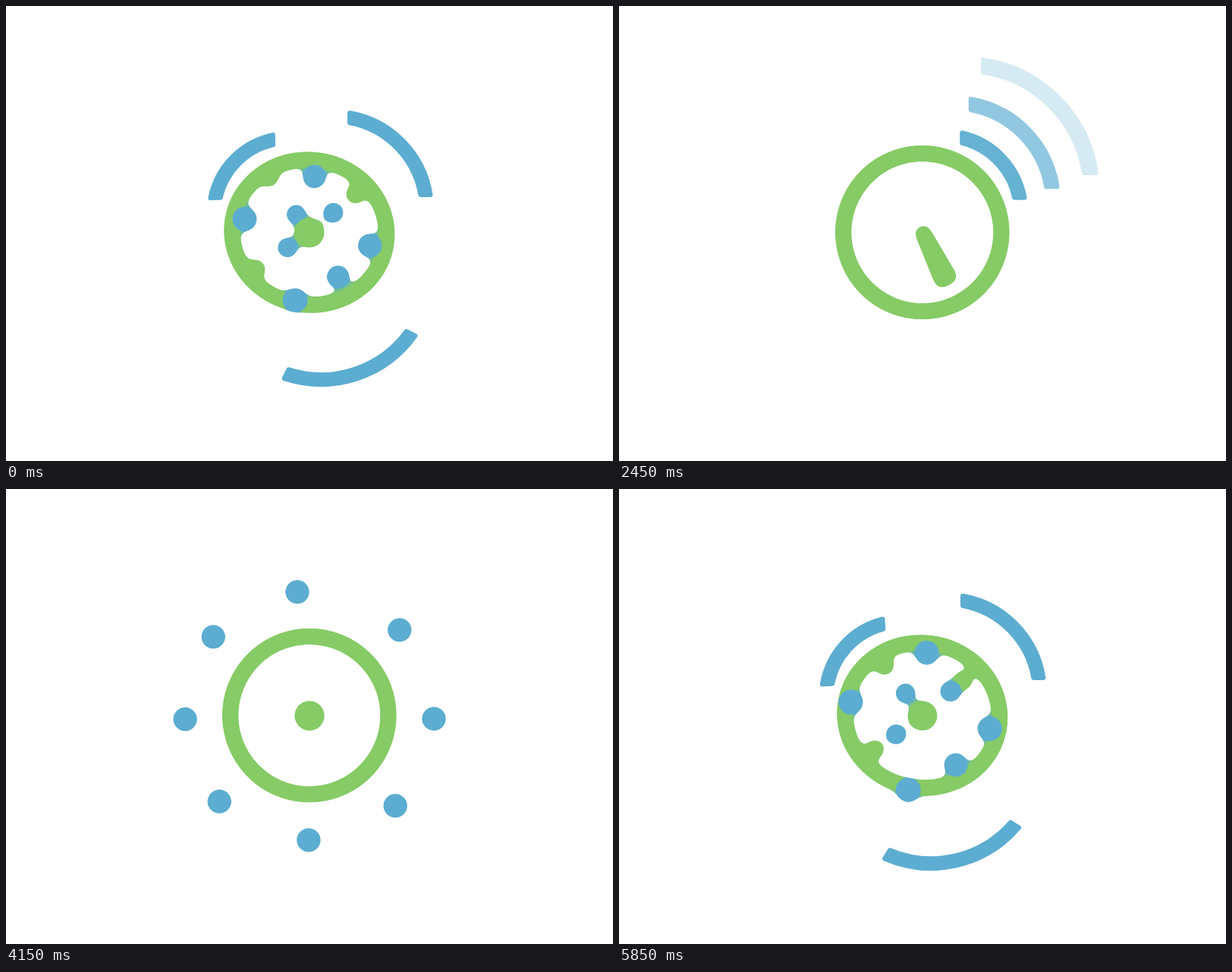
An HTML page for the animation above (5900 ms loop, 800 px wide and 600 px high).

```html
<!DOCTYPE html>
<html lang="en">
<head>
<meta charset="utf-8">
<title>Gooey signal clock</title>
<style>
  html, body { margin: 0; width: 100%; height: 100%; overflow: hidden; background: #fff; }
  svg { display: block; width: 800px; height: 600px; }
</style>
</head>
<body>
<svg viewBox="0 0 800 600">
  <defs>
    <filter id="goo" filterUnits="userSpaceOnUse" x="0" y="0" width="800" height="600" color-interpolation-filters="sRGB">
      <feGaussianBlur in="SourceGraphic" stdDeviation="6" result="blur"/>
      <feColorMatrix in="blur" values="1 0 0 0 0  0 1 0 0 0  0 0 1 0 0  0 0 0 18 -8.3" result="goo"/>
      <feComposite in="SourceGraphic" in2="goo" operator="atop"/>
    </filter>
  </defs>
  <g id="arcs"></g>
  <g id="blobs" filter="url(#goo)"></g>
</svg>
<script>
const LOOP = 5900, FRAME = 50;
const GREEN = '#86cb66', BLUE = '#5cadd1';
const ORBIT = 164, OUT_TIME = 800, IN_TIME = 1450;
const CX = 400, CY = 299;

const arcLayer = document.getElementById('arcs');
const blobLayer = document.getElementById('blobs');

function add(parent, tag, attrs) {
  const el = document.createElementNS('http://www.w3.org/2000/svg', tag);
  set(el, attrs);
  parent.appendChild(el);
  return el;
}
function set(el, attrs) {
  for (const name in attrs) el.setAttribute(name, attrs[name]);
}
const clamp = x => Math.min(1, Math.max(0, x));
const show = (el, on) => set(el, { display: on ? 'inline' : 'none' });

// Smooth monotone curve through [time, value] keys.
function track(...keys) {
  const n = keys.length;
  const sec = i => (keys[i + 1][1] - keys[i][1]) / (keys[i + 1][0] - keys[i][0]);
  const slope = i => {
    if (i === 0) return sec(0);
    if (i === n - 1) return sec(n - 2);
    const a = sec(i - 1), b = sec(i);
    return a * b <= 0 ? 0 : 2 * a * b / (a + b);
  };
  return t => {
    if (t <= keys[0][0]) return keys[0][1];
    if (t >= keys[n - 1][0]) return keys[n - 1][1];
    let i = 0;
    while (t > keys[i + 1][0]) i++;
    const h = keys[i + 1][0] - keys[i][0], u = (t - keys[i][0]) / h, v = 1 - u;
    return keys[i][1] * v * v * (1 + 2 * u) + keys[i + 1][1] * u * u * (3 - 2 * u)
      + h * u * v * (slope(i) * v - slope(i + 1) * u);
  };
}

// The timeline runs from 3100 to 9000, so the loop seam falls where little moves.
const spin = track([3100, -76], [3650, -50], [4850, 0], [5900, 28], [6700, 44]);
const squash = track([5450, 0], [5800, 1], [5950, 1], [6300, 0]);
const hubSize = track([3100, 16], [3300, 19.5], [4850, 20.5], [5900, 20], [6650, 22.5], [7150, 8], [8600, 8], [9000, 16]);
const handLength = track([6500, 0], [6650, 27], [7150, 76], [8500, 76], [9000, 0]);
const handAngles = [
  track([6400, -28], [6650, -10], [7350, 29], [8350, 68], [9000, 92]),
  track([6400, 45], [6650, 85], [7350, 203.5], [8350, 419.5], [9000, 550])
];
const budRadius = track([3550, 88], [3600, 94], [3650, 115], [3850, 98]);

// Signal arcs: quarter bands whose ends are cut vertically and horizontally.
function bandPath(x, y, outer, inner, endX, endY) {
  const R = outer - 3, r = inner + 3, ex = endX + 3, ey = endY + 3;
  const leg = (rad, e) => Math.sqrt(rad * rad - e * e);
  return `M${x + ex} ${y - leg(R, ex)}A${R} ${R} 0 0 1 ${x + leg(R, ey)} ${y - ey}` +
    `H${x + leg(r, ey)}A${r} ${r} 0 0 0 ${x + ex} ${y - leg(r, ex)}Z`;
}
const arcs = [
  { band: [427, 274, 109, 90, 20, 16], mid: [491, 213], pulse: 8310,
    turn: track([5450, -104], [5850, -93.3], [5900, -91.4], [6650, -38], [7350, -6.7], [7600, 0]) },
  { band: [431, 269, 133, 114, 19, 17], mid: [506.5, 195], pulse: 8140, turn: () => 0 },
  { band: [435, 265, 155, 136, 19, 19], mid: [522, 178.5], pulse: 7865,
    turn: track([5450, 150], [5850, 122], [5900, 117], [6650, 36.3], [7350, 2], [7600, 0]) }
];
for (const arc of arcs) {
  arc.el = add(arcLayer, 'path', {
    d: bandPath(...arc.band), fill: BLUE, stroke: BLUE, 'stroke-width': 6, 'stroke-linejoin': 'round'
  });
}

// Each dot: angle on the orbit, then its radius midway out and midway in.
const ring = add(blobLayer, 'ellipse', { fill: 'none', stroke: GREEN, 'stroke-width': 21 });
const bud = add(blobLayer, 'circle', { r: 20, fill: GREEN });
const dots = [
  [-16, 87, 81], [29, 95, 69], [74, 84, 91], [118, 93, 35],
  [164, 79, 87], [206, 100, 30], [247, 66, 74], [292, 93, 41]
].map(([angle, outRadius, inRadius]) => {
  const phase = r => Math.acos(1 - 2 * r / ORBIT) / Math.PI;
  return {
    angle,
    outStart: 3650 - OUT_TIME * phase(outRadius),
    inStart: 5900 - IN_TIME * (1 - phase(inRadius)),
    trail: add(blobLayer, 'circle', { r: 13, fill: GREEN })
  };
});
for (const dot of dots) dot.el = add(blobLayer, 'ellipse', { fill: BLUE });
const hub = add(blobLayer, 'circle', { cx: CX, cy: CY, fill: GREEN });
const hands = handAngles.map(angle => ({
  angle, el: add(blobLayer, 'rect', { x: -10, y: -10.5, height: 21, rx: 7, fill: GREEN })
}));

function drawArcs(t) {
  for (const arc of arcs) {
    const p = clamp((t - arc.pulse) / 640);
    const opacity = clamp((t - 5400) / 150) * (1 - p);
    show(arc.el, opacity > 0);
    const [mx, my] = arc.mid;
    set(arc.el, {
      opacity,
      transform: `translate(${44 * p} ${-44 * p}) translate(${mx} ${my}) scale(${1 + 0.2 * p}) ` +
        `translate(${-mx} ${-my}) rotate(${arc.turn(t)} 400 300)`
    });
  }
}

function drawDots(t) {
  const turn = spin(t);
  for (const dot of dots) {
    const out = clamp((t - dot.outStart) / OUT_TIME);
    const back = clamp((t - dot.inStart) / IN_TIME);
    const radius = ORBIT / 2 * (Math.cos(Math.PI * back) - Math.cos(Math.PI * out));
    const size = Math.min(16.5, 11.8 + 0.053 * radius);
    const place = `translate(${CX} ${CY}) rotate(${dot.angle + turn})`;
    show(dot.el, out > 0 && back < 1);
    set(dot.el, { cx: radius, rx: size + 6.5 * Math.sin(Math.PI * out), ry: size, transform: place });
    // A bump of the ring follows the dot inwards, then springs back.
    const trail = Math.max(radius, 122 - 1.05 * radius);
    show(dot.trail, back > 0 && radius < 90 && trail < 104);
    set(dot.trail, { cx: trail, transform: place });
  }
  show(bud, t >= 3600 && t < 3850);
  set(bud, { cx: budRadius(t), transform: `translate(${CX} ${CY}) rotate(${dots[1].angle + turn})` });
}

function drawClock(t) {
  const s = squash(t);
  set(ring, {
    rx: 104.3 - 2 * s, ry: 104.3 - 8.7 * s,
    transform: `translate(399.8 298.5) rotate(${10.8 * s})`
  });
  set(hub, { r: hubSize(t) });
  const length = handLength(t);
  for (const hand of hands) {
    show(hand.el, length > 5);
    set(hand.el, { width: length + 10, transform: `translate(${CX + 1} ${CY + 1}) rotate(${hand.angle(t)})` });
  }
}

function render(ms) {
  const step = Math.floor(ms % LOOP / FRAME) * FRAME;
  const t = step < 3100 ? step + LOOP : step;
  drawArcs(t);
  drawDots(t);
  drawClock(t);
}

const start = performance.now();
function tick() {
  render(performance.now() - start);
  requestAnimationFrame(tick);
}
tick();
</script>
</body>
</html>
```
